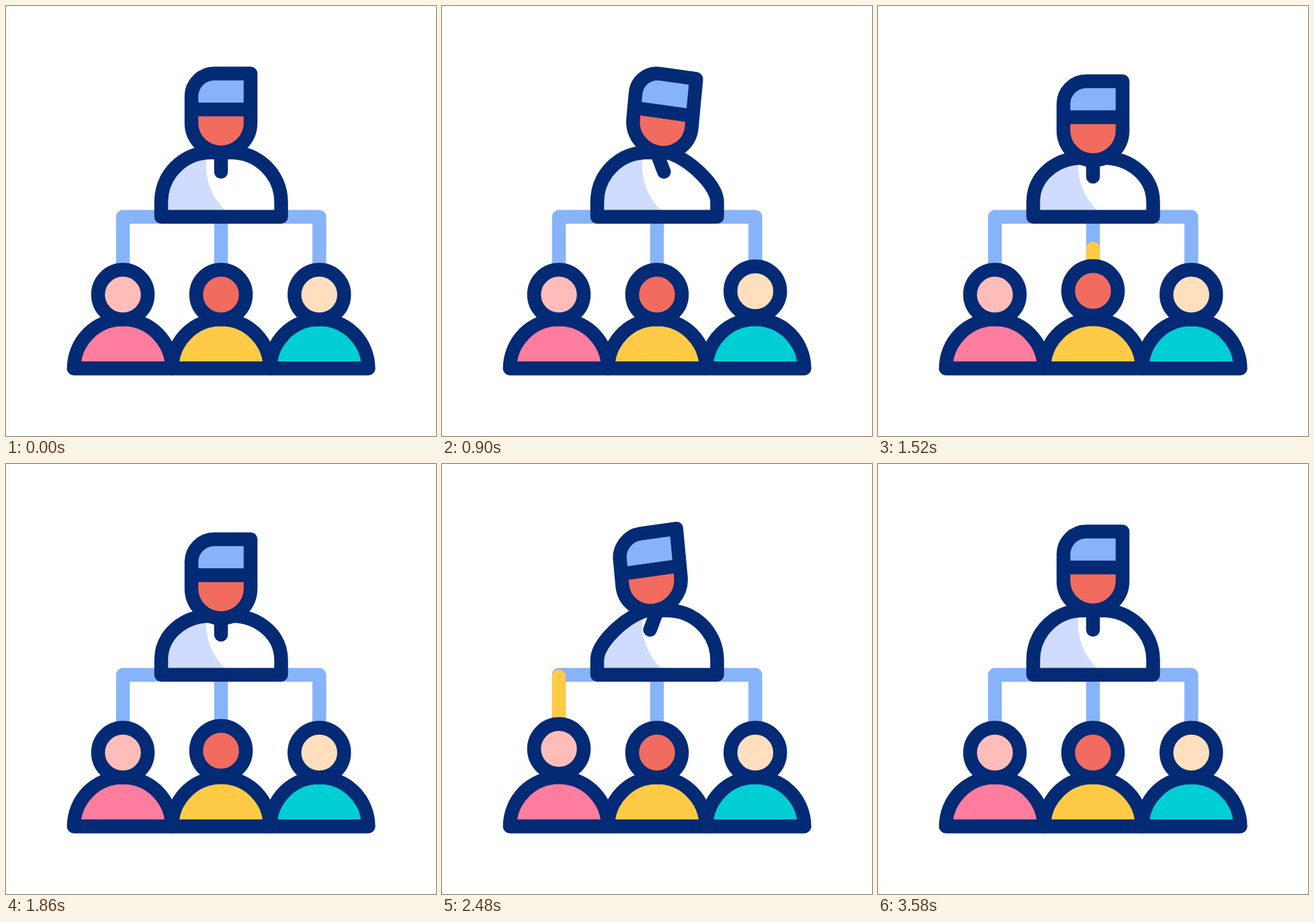
Write an HTML page that moves like this. It is 640 px wide and 640 px high and loops after 3600 ms.

```html
<!DOCTYPE html>
<html lang="en">
<head>
<meta charset="utf-8">
<title>Team lead</title>
<style>
html, body { margin: 0; width: 100%; height: 100%; overflow: hidden; background: #fff; }
svg { display: block; width: 100vw; height: 100vh; }
.ink, .wire, .pulse { stroke-width: 20.5; stroke-linejoin: round; }
.ink { stroke: #032a75; stroke-linecap: round; }
.wire { fill: none; stroke: #87b3f9; }
.pulse { fill: none; stroke: #ffcb47; stroke-linecap: round; }
</style>
</head>
<body>
<svg viewBox="0 0 640 640">
  <defs><clipPath id="bodyClip"><path id="clip"/></clipPath></defs>
  <path class="wire" d="M174 390V313.7H466.3V390M320 313.7V390"/>
  <g id="pulses"></g>
  <path id="bodyFill" fill="#fff"/>
  <path d="M220 200H306A92 92 0 0 0 327 305V320H220Z" fill="#cfdcff" clip-path="url(#bodyClip)"/>
  <path id="body" class="ink" fill="none"/>
  <path id="tie" class="ink" fill="none"/>
  <!-- The chin is the origin of the head -->
  <g id="head">
    <path d="M-44 -44V-83.5A34 34 0 0 1 -10 -117.5H44V-44A44 44 0 0 1 -44 -44Z" fill="#f16c5f"/>
    <path d="M-44 -64V-83.5A34 34 0 0 1 -10 -117.5H44V-64Z" fill="#87b3f9"/>
    <path id="band" class="ink" stroke-linecap="butt" d="M-40 -64H40"/>
    <path class="ink" fill="none" d="M-44 -44V-83.5A34 34 0 0 1 -10 -117.5H44V-44A44 44 0 0 1 -44 -44Z"/>
  </g>
  <g id="team"></g>
</svg>
<script>
const LOOP = 3600, TURN = 320, CORNER = 313.7, BASE = 539.3;
const $ = id => document.getElementById(id);

function add(parent, tag, attrs) {
  const el = document.createElementNS('http://www.w3.org/2000/svg', tag);
  for (const k in attrs) el.setAttribute(k, attrs[k]);
  return parent.appendChild(el);
}

const ease = u => (1 - Math.cos(Math.PI * Math.min(1, Math.max(0, u)))) / 2;

// tilt: -1 looks left, 1 looks right; nod: 1 looks down
const turns = [
  { at: 0, tilt: 1, nod: 0 },
  { at: 1055, tilt: 0, nod: 1 },
  { at: 2015, tilt: -1, nod: 0 },
  { at: 3260, tilt: 0, nod: 0 }
];

const team = [
  { x: 174, start: turns[2].at, skin: '#ffbdba', shirt: '#ff7d9f' },
  { x: 320, start: turns[1].at, skin: '#f16c5f', shirt: '#ffcb47' },
  { x: 466.3, start: turns[0].at, skin: '#ffdfbd', shirt: '#00ced5' }
];
for (const m of team) {
  add($('team'), 'path', { class: 'ink', fill: m.shirt, d: `M${m.x - 73} ${BASE}a73 73 0 0 1 146 0Z` });
  m.pulse = add($('pulses'), 'path', { class: 'pulse', d: `M320 ${CORNER}H${m.x}V382` });
  m.len = Math.abs(m.x - 320) + 382 - CORNER;
}
add($('team'), 'path', { class: 'ink', d: `M101 ${BASE}H539.3` });
for (const m of team) {
  m.head = add($('team'), 'circle', { class: 'ink', fill: m.skin, cx: m.x, r: 37 });
}

function pose(t) {
  const i = turns.findLastIndex(k => k.at <= t);
  const to = turns[i], from = turns[(i + turns.length - 1) % turns.length];
  const u = ease((t - to.at) / TURN);
  const mix = key => from[key] + (to[key] - from[key]) * u;
  return { tilt: mix('tilt'), nod: mix('nod') };
}

function drawBoss(t) {
  const { tilt, nod } = pose(t);
  const lean = Math.abs(tilt);
  $('head').setAttribute('transform', `matrix(${1 - 0.01 * lean} ${0.14 * tilt} ${-0.092 * tilt} ${1 - 0.015 * lean} ${320 + 4 * tilt} ${218 + 11.5 * nod})`);
  $('band').setAttribute('transform', `translate(0 ${2.7 * lean})`);
  $('tie').setAttribute('d', `M${320 + tilt} 222L${320 + 10.3 * tilt} ${246.7 + 7.3 * nod}`);

  // The shoulder on the side of the lean gets flatter
  const top = 218 + 8 * nod;
  const shoulder = side => {
    const flat = Math.max(0, side * tilt);
    return {
      side: `${320.2 + side * 89.3} ${251 + 15 * flat + 3 * nod}`,
      top: `${320 + side * (56 - 9 * flat)} ${top + 9 * flat}`
    };
  };
  const l = shoulder(-1), r = shoulder(1);
  const d = `M231 ${CORNER}V292C${l.side} ${l.top} 305 ${top}H335C${r.top} ${r.side} 409.5 292V${CORNER}Z`;
  for (const id of ['clip', 'bodyFill', 'body']) $(id).setAttribute('d', d);
}

function drawMember(m, t) {
  const s = t - m.start;
  const lead = ease(s / 230) * m.len, tail = ease((s - 322) / 230) * m.len;
  m.pulse.style.display = s > 0 && s < 552 ? '' : 'none';
  m.pulse.setAttribute('stroke-dasharray', `${Math.max(0.01, lead - tail)} 999`);
  m.pulse.setAttribute('stroke-dashoffset', -tail);

  // Two hops once the pulse arrives
  const hops = (s - 245) / 480;
  const lift = hops > 0 && hops < 2 ? 5.6 * Math.abs(Math.sin(Math.PI * hops)) : 0;
  m.head.setAttribute('cy', 429.6 - lift);
}

function draw(t) {
  drawBoss(t);
  for (const m of team) drawMember(m, t);
}

const t0 = performance.now();
function tick() {
  draw((performance.now() - t0) % LOOP);
  requestAnimationFrame(tick);
}
tick();
</script>
</body>
</html>
```
